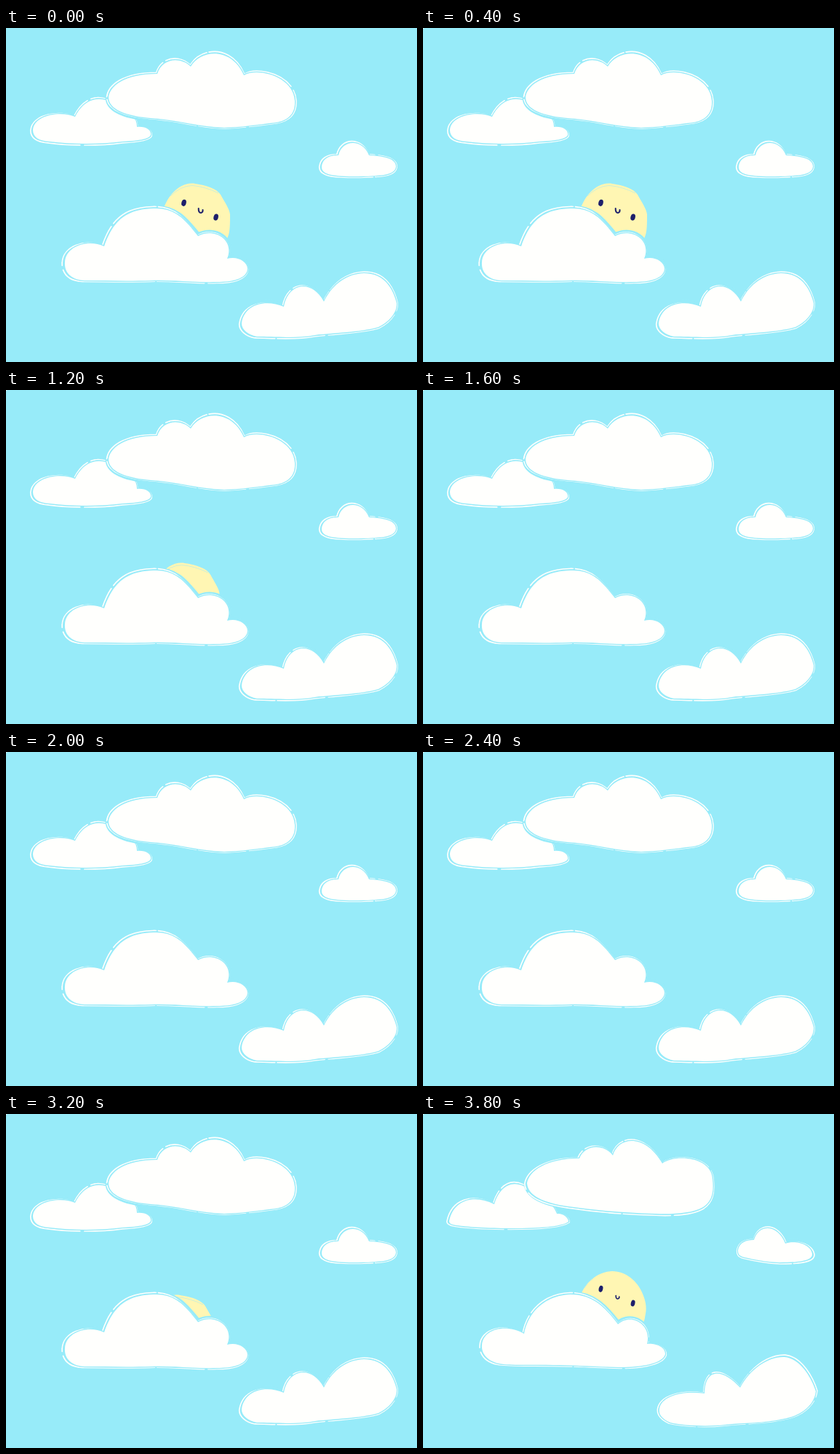
Recreate the animation shown at these times as an HTML page. Size 565 by 459 pixels, loop 4000 ms.

```html
<!DOCTYPE html>
<html lang="en">
<head>
<meta charset="utf-8">
<title>Shy sun</title>
<style>
  html, body { margin: 0; width: 100%; height: 100%; overflow: hidden; background: #97ebf9; }
  svg { display: block; width: 565px; height: 459px; }
  .halo { fill: #97ebf9; stroke: #97ebf9; stroke-width: 9; stroke-linejoin: round; }
  .sketch { fill: none; stroke: #fffffd; stroke-width: 1.6; stroke-linecap: round; stroke-dasharray: 96 5 64 3 130 6; }
  .gap { fill: none; stroke: #97ebf9; stroke-width: 2.6; }
  .puff { fill: #fffffd; }
  .sun { fill: #fff6b3; }
  .scratch { fill: none; stroke: #c9efd9; stroke-width: .9; }
  .eye { fill: #1d1f6b; }
  .mouth { fill: none; stroke: #1d1f6b; stroke-linecap: round; }
</style>
</head>
<body>
<svg id="stage" viewBox="0 0 565 459">
  <rect width="565" height="459" fill="#97ebf9"/>
  <rect id="speck" width="1.2" height="1" fill="#fffffd"/>
</svg>
<script>
const NS = 'http://www.w3.org/2000/svg';
const STEP = 200, LOOP = 4000;
const stage = document.getElementById('stage');
const speck = document.getElementById('speck');

// Two hand-drawn poses that alternate. Clouds: [path, sketch dx, sketch dy].
const poses = [
  {
    sun: 'M214 262C216 235 238 210 260 214C275 216 290 221 295 229C301 240 308 250 308 257C308 270 308 280 305 287Q302 295 296 300H226Q213 284 214 262Z',
    scratch: 'M226 231Q240 217 256 216.500Q274 218 292 227',
    mouth: ['M264.700 248Q264.500 254 268 254Q271 253.500 270.500 250', 2],
    eye: [3.2, 4.6],
    clouds: [
      ['M37 140C39 118 78 114 95 122C103 106 118 92 140 100C170 112 180 122 180 136C192 135 200 140 199 147C197 153 180 155 160 156C130 160 90 160 60 156C45 155 37 150 37 140Z', -1, 0],
      ['M141 95C143 80 162 63 208 63C214 43 238 38 254 53C268 29 310 26 327 65C345 54 395 66 397 100C398 118 388 127 370 130C345 133 325 136 300 137C265 136 235 126 200 124C165 121 141 112 141 95Z', -.3, -.8],
      ['M434 190C436 178 446 175 457 175C462 153 490 152 499 175C515 176 537 178 536 191C534 203 515 203 484 204C450 204 433 202 434 190Z', -1, -.5],
      ['M81 322C82 300 112 290 135 300C148 262 168 249 203 248C232 247 245 262 264 286C285 274 315 290 304 317C318 313 332 321 332 331C331 345 310 349 290 349C260 350 230 346 200 347C165 348 135 347 108 347C90 346 80 336 81 322Z', -1.6, -.5],
      ['M324 405C328 380 356 372 382 383C388 350 420 345 437 376C450 350 470 338 492 337C520 337 532 358 537 378C538 392 525 405 512 411C490 418 450 419 425 422C400 427 365 424 345 424C333 422 323 414 324 405Z', -1, 0]
    ]
  },
  {
    sun: 'M214 262C216 238 236 217 260 216C280 216 294 231 299 241C305 252 308 264 306 274Q304 291 296 300H226Q213 284 214 262Z',
    scratch: 'M222 239Q227 230 234 226',
    mouth: ['M265.200 249.500Q265 254 267.800 254Q270 253.500 269.800 251', 1.6],
    eye: [2.8, 4.5],
    clouds: [
      ['M36 147C42 118 70 110 98 124C104 104 118 90 138 99C160 112 178 120 184 137C192 136 200 142 200 148C190 155 160 157 120 157C90 157 60 155 46 153C38 152 36 150 36 147Z', -1, -.5],
      ['M143 95C146 78 170 61 215 61C222 42 248 40 261 57C268 31 305 26 329 68C345 55 397 58 398 90C400 108 397 120 385 128C370 137 340 138 320 137C275 136 235 132 200 127C165 122 144 112 143 95Z', -1, .3],
      ['M433 187C435 176 445 173 455 173C462 150 488 152 498 178C512 173 533 179 535 192C536 202 515 204 490 204C470 203 455 200 442 197C434 195 433 192 433 187Z', .8, 0],
      ['M81 318C82 295 115 288 139 302C145 270 170 249 203 248C235 248 252 268 268 289C285 273 315 288 308 316C320 315 333 320 333 330C330 343 300 348 270 348C235 347 205 345 180 345C150 344 120 346 105 343C90 340 80 330 81 318Z', -.8, -.5],
      ['M325 405C328 388 355 380 387 384C388 348 412 350 436 376C450 350 475 333 497 334C520 336 535 365 540 381C538 400 520 415 495 419C470 425 440 424 415 427C390 430 355 428 340 424C327 418 324 412 325 405Z', -.3, -.8]
    ]
  }
];

// How far the sun has sunk at each step; null while it is fully hidden.
const sink = [0, 0, 0, 0, 0, 9, 24, 43, null, null, null, null, null, null, null, null, 35, 17, 5, 0];

function add(parent, tag, attrs) {
  const el = document.createElementNS(NS, tag);
  for (const key in attrs) el.setAttribute(key, attrs[key]);
  return parent.appendChild(el);
}

function drawCloud(parent, [d, dx, dy]) {
  add(parent, 'path', { d, class: 'halo' });
  const line = add(parent, 'path', { d, class: 'sketch' });
  const { x, y, width, height } = line.getBBox();
  const cx = x + width / 2, cy = y + height / 2;
  const sx = 1 + 4.4 / width, sy = 1 + 4 / height;
  line.setAttribute('transform',
    `translate(${cx + dx} ${cy + dy}) scale(${sx} ${sy}) translate(${-cx} ${-cy})`);
  add(parent, 'path', { d, class: 'gap' });
  add(parent, 'path', { d, class: 'puff' });
}

function drawPose({ sun, scratch, mouth, eye, clouds }) {
  const root = add(stage, 'g', {});
  const body = add(root, 'g', {});
  add(body, 'path', { d: sun, class: 'sun' });
  add(body, 'path', { d: scratch, class: 'scratch' });
  for (const [x, y] of [[244.5, 240.3], [288.6, 260]]) {
    add(body, 'ellipse', { class: 'eye', rx: eye[0], ry: eye[1], transform: `translate(${x} ${y}) rotate(14)` });
  }
  add(body, 'path', { d: mouth[0], class: 'mouth', 'stroke-width': mouth[1] });
  clouds.forEach(c => drawCloud(root, c));
  return { root, body };
}

const drawn = poses.map(drawPose);
const start = performance.now();

function render(now) {
  const step = Math.floor((Math.max(0, now - start) % LOOP) / STEP);
  const drop = sink[step];
  drawn.forEach(({ root, body }, i) => {
    root.style.display = i === step % 2 ? '' : 'none';
    body.style.display = drop === null ? 'none' : '';
    body.setAttribute('transform', `translate(${-.6 * drop} ${drop})`);
  });
  speck.style.display = step < 2 ? 'none' : '';
  requestAnimationFrame(render);
}
render(start);
</script>
</body>
</html>
```
